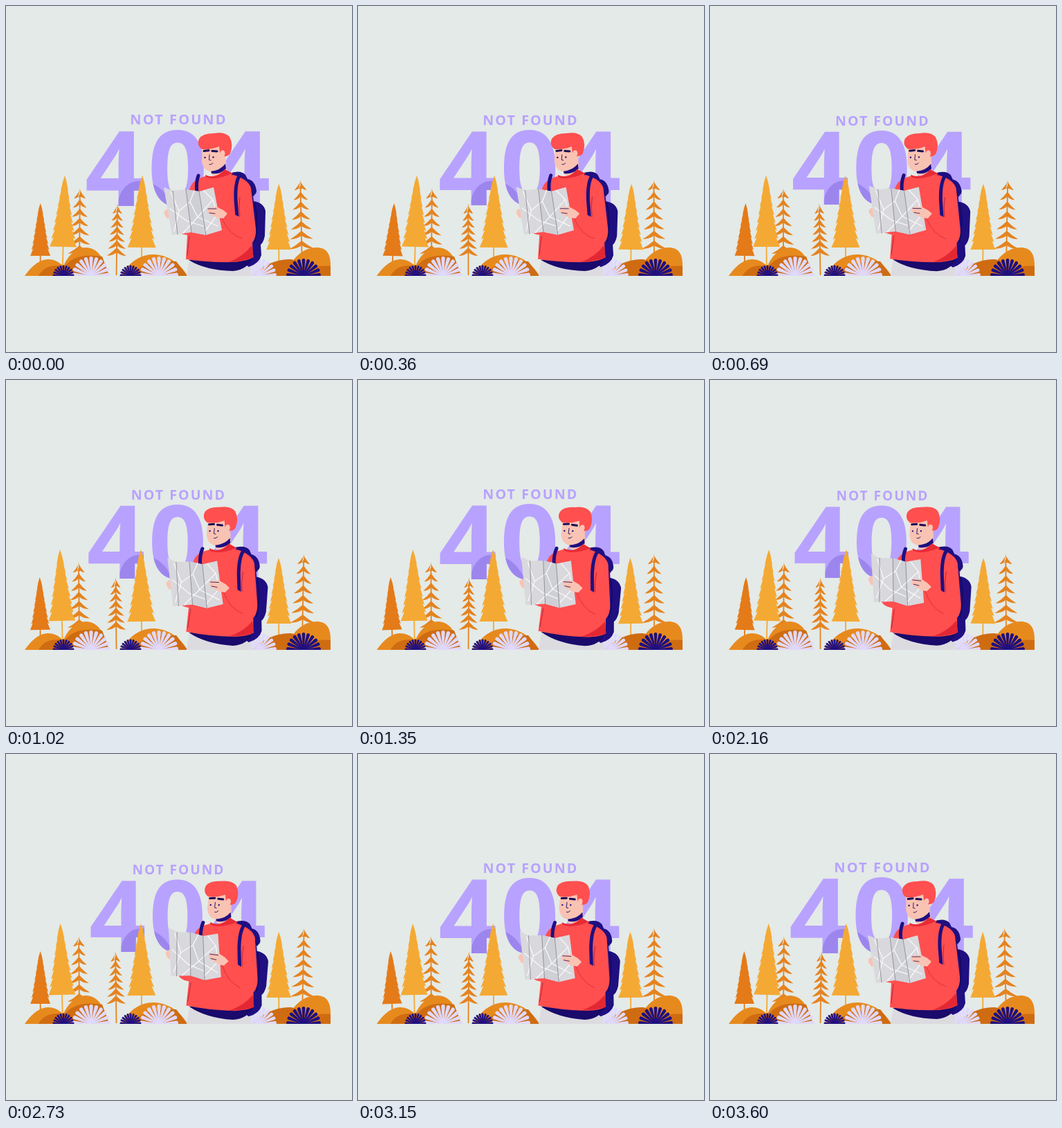
These frames come from a looping animation (500x500 px, 3.63 s). An HTML page:

```html
<!DOCTYPE html>
<html lang="en">
<head>
<meta charset="utf-8">
<title>Not found</title>
<style>
  html, body { margin: 0; width: 100%; height: 100%; overflow: hidden; background: #e4eae7; }
  svg { display: block; width: 100vw; height: 100vh; }
  text { font-family: "Open Sans", "Noto Sans", sans-serif; font-weight: 700; }
  .red { fill: #ff4f4f; }
  .navy { fill: #1f0f80; }
  .skin { fill: #f9c3b3; }
  .line { fill: none; stroke-linecap: round; stroke-linejoin: round; }
</style>
</head>
<body>
<svg viewBox="0 0 500 500">
  <defs>
    <clipPath id="digits"><text x="157 248 339" y="288.5" font-size="151" text-anchor="middle">404</text></clipPath>
    <clipPath id="ground"><rect width="500" height="390"/></clipPath>
  </defs>

  <g id="sign" fill="#b8a2ff">
    <text x="179.3" y="171.3" font-size="20" letter-spacing="2.1">NOT FOUND</text>
    <text x="157 248 339" y="288.5" font-size="151" text-anchor="middle">404</text>
    <path clip-path="url(#digits)" fill="#9c86ee" d="M160 292C163 268 174 253 192 253C214 253 232 266 242 292Z"/>
  </g>

  <g id="trees"></g>

  <g clip-path="url(#ground)">
    <g fill="#e78a1e">
      <path d="M27 390C38 374 50 366 61 366C75 366 84 375 92 390Z"/>
      <path d="M78 390C84 366 98 349 116 349C136 350 143 370 149 390Z"/>
      <path d="M166 390C178 370 194 359 213 359C237 360 253 374 262 390Z"/>
      <path d="M405 390C411 366 428 349 449 349C463 349 469 358 469 375V390Z"/>
    </g>
    <g fill="#cf6c12">
      <path d="M47 390C54 377 67 373 85 376L92 390Z"/>
      <path d="M80 384C90 364 108 358 139 362L149 390H79Z"/>
      <path d="M180 390C190 375 216 368 246 369L262 390Z"/>
      <path d="M354 390C370 376 388 366 410 366C422 366 430 376 434 390Z"/>
      <path d="M428 390C436 379 450 374 469 376V390Z"/>
    </g>
    <g id="fans"></g>
  </g>

  <path fill="#dcdbe0" d="M265 366L354 368V390H261Z"/>
  <g id="man">
    <path class="navy" d="M322 242Q339 236 346 244L349 250Q360 252 362 267Q362 272 357 274L358 282Q372 284 375 296L374 332Q372 342 368 345L369 360Q366 372 351 377L325 360Z"/>
    <path class="line" stroke="#140759" stroke-width="1.5" d="M340 252Q352 262 358 274M359 284Q366 312 360 340"/>
    <path fill="#190a6b" d="M264 367Q288 382 328 383Q350 381 357 362Z"/>
    <path class="red" d="M289 246Q270 250 266 263L251 298L245 318Q246 329 262 331L260 366Q292 371 330 370Q351 368 357 363L356 342Q362 334 361 322L354 263Q350 250 328 244Q308 252 289 246Z"/>
    <path fill="#e32834" d="M322 370Q343 362 355 346L358 363Q344 369 322 370Z"/>
    <path class="line" stroke="#a41f3a" stroke-width=".8" d="M265 333L262 360M338 304Q336 292 338 276"/>
    <path class="line" stroke="#1f0f80" stroke-width="5" stroke-linecap="butt" d="M278 245Q274 256 276 270M337 246Q331 256 332 280L334 305"/>

    <path class="skin" d="M298 226L317 216L319 240Q309 250 297 244Z"/>
    <path class="navy" d="M296 238Q308 239 317 228L318 235Q309 244 297 242Z"/>
    <path fill="#e92b35" d="M288 244Q303 251 316 236L328 242Q313 256 290 253Z"/>
    <path class="red" d="M286 246Q300 254 326 242L327 247Q308 258 288 254Z"/>
    <path class="skin" d="M284 202L283 225Q285 237 294 239Q306 240 313 226L318 214L312 200Z"/>
    <path class="red" d="M283 207Q275 201 279 192Q284 184 300 184Q316 181 323 189Q329 200 324 213Q321 218 315 217L314 211L309 212L308 203Q296 208 283 207Z"/>
    <ellipse class="skin" cx="313" cy="213" rx="3.4" ry="4.5"/>
    <path class="line" stroke="#1b0d55" stroke-width="3" d="M286 209.5L293 208.7M298 209.5L305 210"/>
    <circle class="navy" cx="287.5" cy="219" r="1.2"/>
    <circle class="navy" cx="299.5" cy="218.5" r="1.2"/>
    <path class="line" stroke="#1b0d55" stroke-width=".9" d="M294 215L293.5 222.5L296 223M294 229Q297 230 299 227"/>

    <g id="arms">
      <path class="red" d="M355 312Q356 340 340 336L311 306L319 296L340 306Z"/>
      <path class="line" stroke="#cf2f3f" stroke-width=".8" d="M312 307Q322 330 341 336"/>
      <path class="skin" d="M243 294L232 294Q227 297 229 301L233 307L243 307Z"/>
      <path fill="#d9d9dd" d="M228 262L241 267L260 265L279 268L300 262L312 324L289 331L268 327L240 331Z"/>
      <path fill="#cfcfd6" d="M260 265L279 268L289 331L268 327Z"/>
      <path class="line" stroke="#f8f8fa" stroke-width="1.3" d="M238 269L250 296L243 325M250 296L266 283L277 305L256 328M266 283L272 267M277 305L299 280L286 267M277 305L306 318M299 280L305 302L288 325M237 293L262 311L285 318"/>
      <path class="line" stroke="#77777f" stroke-width=".7" d="M241 267L248 330M260 265L268 327M279 268L289 331"/>
      <path class="skin" d="M291 292L304 290L314 295L320 300L314 307L305 306L297 302L291 299Z"/>
      <path class="line" stroke="#1b0d55" stroke-width=".8" d="M292 293L304 293M294 299L302 300"/>
    </g>
  </g>
</svg>

<script>
const LOOP = 3630, STEP = 30;
const $ = id => document.getElementById(id);

function add(parent, name, attrs) {
  const el = document.createElementNS('http://www.w3.org/2000/svg', name);
  for (const key in attrs) el.setAttribute(key, attrs[key]);
  return parent.appendChild(el);
}

// Serrated fir outline, built on the right and mirrored to the left
function firPath(x, top, bottom, half) {
  const n = 9, side = [];
  for (let i = 1; i <= n; i++) {
    const y = top + (bottom - top) * i / n;
    const w = half * (0.08 + 0.92 * i / n);
    side.push([w, y]);
    if (i < n) side.push([w * 0.8, y - 2]);
  }
  const right = side.map(([w, y]) => `${x + w} ${y}`);
  const left = side.map(([w, y]) => `${x - w} ${y}`).reverse();
  return `M${x} ${top}L${right.join('L')}L${left.join('L')}Z`;
}

// Pairs of drooping blades along a stem
function pinePath(x, top, bottom, half) {
  const n = 7, gap = (bottom - top - 14) / (n - 1);
  let d = `M${x} ${top}l2.5 12h-5z`;
  for (let i = 0; i < n; i++) {
    const y = top + 2 + gap * i, w = half * (0.5 + 0.5 * i / (n - 1));
    for (const s of [-1, 1]) {
      d += `M${x} ${y}Q${x + s * w * 0.45} ${y + 7} ${x + s * w} ${y + 12}`
         + `Q${x + s * w * 0.4} ${y + 12} ${x} ${y + 7}Z`;
    }
  }
  return d;
}

// shape, x, top, leaf bottom, half width, root, colour, sway in px, peak of sway
const trees = [
  [pinePath, 106, 264, 358, 17, 386, '#e5831f', 1, 0.1],
  [pinePath, 159.5, 286, 361, 14, 389, '#e5831f', 1.7, 0.92],
  [pinePath, 428, 252, 351, 18, 380, '#e5831f', 2.7, 0.48],
  [firPath, 49.7, 285, 361, 14.5, 380, '#e47a18', 2.6, 0.25],
  [firPath, 81.8, 245, 348, 19.5, 380, '#f4a934', 4, 0.1],
  [firPath, 196, 245, 349, 20.5, 370, '#f4a934', 1.2, 0.1],
  [firPath, 394.3, 257, 352, 18, 376, '#f4a934', 0.9, 0.25]
].map(([shape, x, top, bottom, half, root, color, sway, peak]) => {
  const el = add($('trees'), 'g', { fill: color });
  add(el, 'rect', { x: x - 0.9, y: top + 8, width: 1.8, height: root - top - 8 });
  add(el, 'path', { d: shape(x, top, bottom, half) });
  return { el, x, root, peak, amp: sway / (root - top) * 180 / Math.PI };
});

function fan(x, r, n, color) {
  const y = 390, w = r * 1.05 / n;
  for (let i = 0; i < n; i++) {
    const turn = -86 + 172 * i / (n - 1);
    add($('fans'), 'path', {
      fill: color,
      d: `M${x - 0.6} ${y}L${x - w} ${y - r + w}A${w} ${w} 0 0 1 ${x + w} ${y - r + w}L${x + 0.6} ${y}Z`,
      transform: `rotate(${turn} ${x} ${y})`
    });
  }
  add($('fans'), 'circle', { cx: x, cy: y, r: r * 0.2, fill: color });
}
const NAVY = '#1f0f80', LILAC = '#e0d9fb';
fan(123, 28, 11, LILAC);
fan(221, 28, 11, LILAC);
fan(366, 25, 11, LILAC);
fan(83, 15.5, 11, NAVY);
fan(180, 15.5, 11, NAVY);
fan(430, 25, 11, NAVY);

// Smooth looping curve without overshoot
const times = [0, 690, 1350, 2160, 2730, 3150];
function curve(values) {
  const n = times.length;
  const at = i => times[(i + n) % n] + LOOP * Math.floor(i / n);
  const val = i => values[(i + n) % n];
  const slope = i => (val(i + 1) - val(i)) / (at(i + 1) - at(i));
  const tangent = i => {
    const a = slope(i - 1), b = slope(i);
    return a * b > 0 ? 2 * a * b / (a + b) : 0;
  };
  return t => {
    let i = n - 1;
    while (times[i] > t) i--;
    const h = at(i + 1) - at(i), u = (t - at(i)) / h, v = 1 - u;
    return v * v * (1 + 2 * u) * val(i) + u * u * (3 - 2 * u) * val(i + 1)
         + h * u * v * (v * tangent(i) - u * tangent(i + 1 === n ? 0 : i + 1));
  };
}
const lean = curve([0, 0.9, 4, 2, 3.05, 2.9]);
const lift = curve([0, 0.5, 0.7, 4.5, 3.8, 0.8]);
const zoom = curve([1, 0.974, 0.985, 0.955, 0.955, 0.982]);

function draw(t) {
  for (const { el, x, root, peak, amp } of trees) {
    const turn = amp * Math.cos(2 * Math.PI * (2 * t / LOOP - peak));
    el.setAttribute('transform', `rotate(${turn} ${x} ${root})`);
  }
  $('sign').setAttribute('transform', `translate(248 236) scale(${zoom(t)}) translate(-248 -236)`);
  $('man').setAttribute('transform', `rotate(${lean(t)} 308 373)`);
  $('arms').setAttribute('transform', `rotate(${lift(t)} 335 265)`);
}

const start = performance.now();
function tick() {
  const t = (performance.now() - start) % LOOP;
  draw(Math.floor(t / STEP) * STEP);
  requestAnimationFrame(tick);
}
tick();
</script>
</body>
</html>
```
